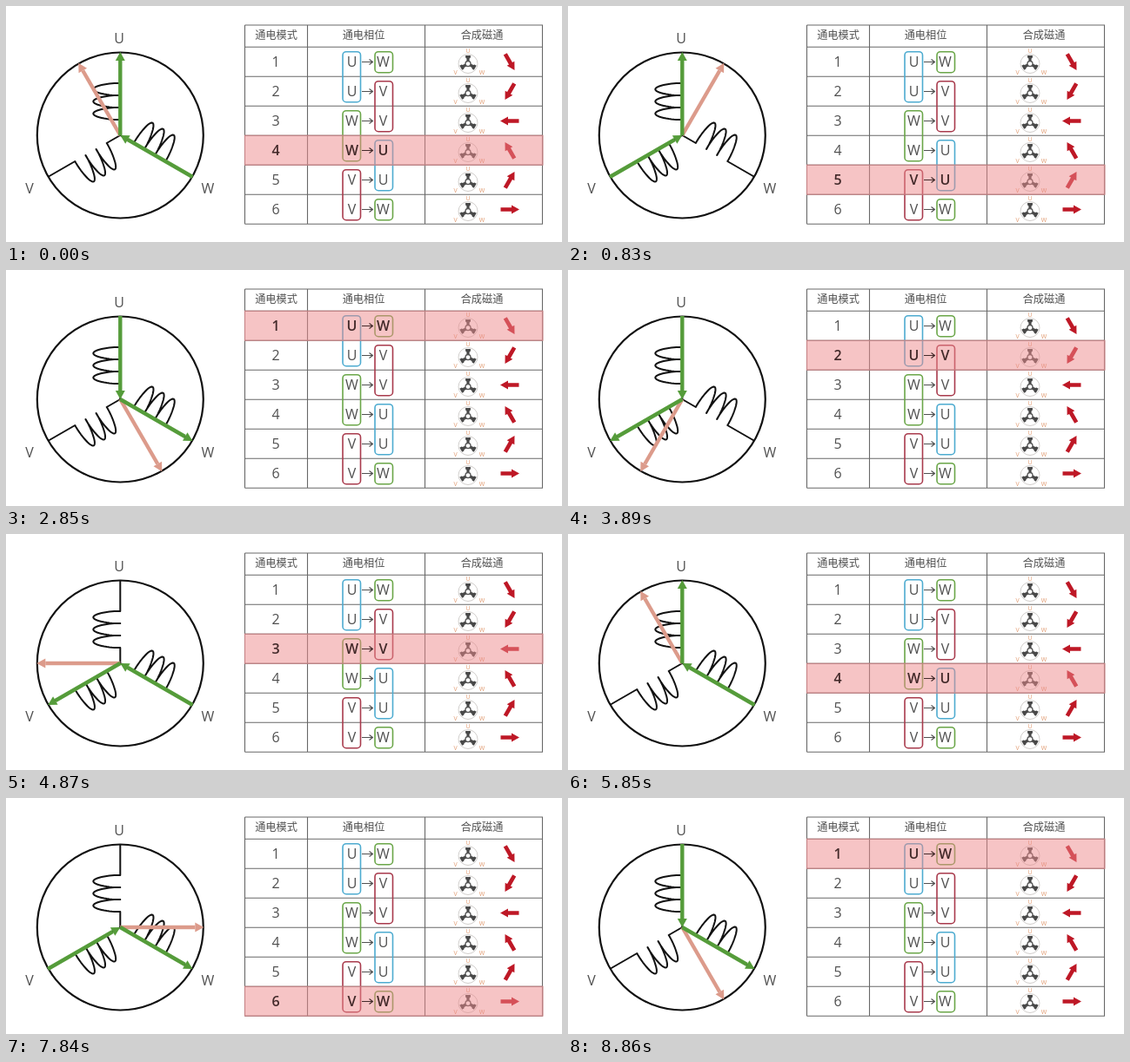
Write an HTML page that moves like this. It is 639 by 272 pixels and loops after 8.96 s.

```html
<!DOCTYPE html>
<html lang="zh">
<head>
<meta charset="utf-8">
<style>
html, body { margin: 0; width: 100%; height: 100%; overflow: hidden; background: #fff; }
svg { display: block; width: 639px; height: 272px; }
text { font-family: "Open Sans", "Noto Sans", sans-serif; font-size: 16px; fill: #505050; text-anchor: middle; }
.head { font-family: "Noto Sans CJK SC", "Noto Sans CJK", sans-serif; font-size: 12.2px; }
.tiny { font-size: 7px; fill: #e09a70; }
.active text { fill: #432a2a; font-weight: 600; }
.active path { stroke: #432a2a; }
</style>
</head>
<body>
<svg id="stage" viewBox="0 0 639 272"></svg>
<script>
const LOOP = 8960;
const STEPS = [[0, 4], [830, 5], [1850, 6], [2850, 1], [3890, 2], [4870, 3],
  [5850, 4], [6870, 5], [7840, 6], [8860, 1]];
const MODES = ['UW', 'UV', 'WV', 'WU', 'VU', 'VW'];
const AXIS = { U: -90, V: 150, W: 30 };
const GREEN = '#559c3a', FLUX = '#dc9b8b', RED = '#be1826';
const TOP = 47.2, PITCH = 34, LEFT = 274.5, RIGHT = 617;
const stage = document.getElementById('stage');

function add(parent, tag, attrs = {}, content) {
  const node = document.createElementNS('http://www.w3.org/2000/svg', tag);
  for (const key in attrs) node.setAttribute(key, attrs[key]);
  if (content) node.textContent = content;
  parent.append(node);
  return node;
}
const group = (parent, transform = '') => add(parent, 'g', { transform });
const stroke = (parent, d, color, width) =>
  add(parent, 'path', { d, fill: 'none', stroke: color, 'stroke-width': width, 'stroke-linejoin': 'round' });
const label = (parent, x, y, content, cls = '') => add(parent, 'text', { x, y, class: cls }, content);

// Straight arrow along the x axis of its group, ending at x = to.
function arrow(parent, angle, from, to, color) {
  const g = group(parent, `rotate(${angle})`);
  const back = to - Math.sign(to - from) * 10;
  stroke(g, `M${from} 0H${back}`, color, 4.4);
  add(g, 'path', { d: `M${to} 0L${back} -5.5V5.5Z`, fill: color });
}

// Winding on the upward axis, bulging to the left.
function coilPath() {
  const turns = 3, start = -60, end = -18, steps = 96;
  let d = 'M0 -96';
  for (let i = 0; i <= steps; i++) {
    const t = i / steps, a = t * turns * 2 * Math.PI;
    const x = -15.5 + 15.5 * Math.cos(a);
    const y = start + (end - start) * t - 2.5 * Math.sin(a);
    d += `L${x.toFixed(1)} ${y.toFixed(1)}`;
  }
  return d + 'L0 0';
}

function drawMotor() {
  const motor = group(stage, 'translate(131.3 149)');
  add(motor, 'circle', { r: 95.5, fill: 'none', stroke: '#111', 'stroke-width': 2.2 });
  const coil = coilPath();
  for (const phase in AXIS) stroke(group(motor, `rotate(${AXIS[phase] + 90})`), coil, '#111', 2);
  label(stage, 130, 43, 'U');
  label(stage, 27, 216, 'V');
  label(stage, 232, 216, 'W');
  return MODES.map(([source, sink], i) => {
    const g = group(motor);
    arrow(g, 60 * (i + 1), 0, 96, FLUX);
    arrow(g, AXIS[sink], 0, 96, GREEN);
    arrow(g, AXIS[source], 96, 0, GREEN);
    return g;
  });
}

function drawIcon(y) {
  const g = group(stage, `translate(531 ${y})`);
  add(g, 'circle', { r: 11, fill: 'none', stroke: '#c4c0be', 'stroke-width': 0.8 });
  for (const angle of Object.values(AXIS)) {
    const arm = group(g, `rotate(${angle})`);
    add(arm, 'path', { d: 'M2 -1.6H6L7 -2.9H9.5V2.9H7L6 1.6H2Z', fill: '#484848' });
  }
  add(g, 'circle', { r: 3, fill: '#fff', stroke: '#555', 'stroke-width': 1.3 });
  label(g, 0, -13, 'U', 'tiny');
  label(g, -14.5, 12.5, 'V', 'tiny');
  label(g, 16, 12.5, 'W', 'tiny');
}

function drawTable() {
  let grid = `M${LEFT} 22H${RIGHT}`;
  for (let i = 0; i <= 6; i++) grid += `M${LEFT} ${TOP + i * PITCH}H${RIGHT}`;
  for (const x of [LEFT, 346.5, 481.5, 616.5]) grid += `M${x} 22V${TOP + 6 * PITCH}`;
  stroke(stage, grid, '#686868', 1.1);
  label(stage, 310.5, 38, '通电模式', 'head');
  label(stage, 411, 38, '通电相位', 'head');
  label(stage, 547, 38, '合成磁通', 'head');

  const blue = '#4dabd0', green = '#6aa648', red = '#a83a4c';
  const frames = [[387, 0, 2, blue], [424, 0, 1, green], [424, 1, 2, red], [387, 2, 2, green],
    [424, 3, 2, blue], [387, 4, 2, red], [424, 5, 1, green]];
  for (const [x, row, span, color] of frames) {
    add(stage, 'rect', { x, y: 52.7 + row * PITCH, width: 20.5, height: span * PITCH - 10, rx: 4,
      fill: 'none', stroke: color, 'stroke-width': 1.6 });
  }
  MODES.forEach((mode, i) => {
    const y = 64.5 + i * PITCH;
    drawIcon(y + 2);
    const g = group(stage, `translate(579 ${y}) rotate(${60 * (i + 1)})`);
    add(g, 'path', { d: 'M-10.5 -2.3H2V-5L11 0L2 5V2.3H-10.5Z', fill: RED });
  });

  const band = add(stage, 'rect', { x: LEFT, width: RIGHT - LEFT, height: PITCH,
    fill: '#ee8a8c', 'fill-opacity': 0.5, stroke: '#c98486', 'stroke-width': 1 });
  const rows = MODES.map(([source, sink], i) => {
    const y = 64.5 + i * PITCH;
    const g = group(stage);
    label(g, 310, y + 5.8, String(i + 1));
    label(g, 397.5, y + 5.8, source);
    label(g, 433.5, y + 5.8, sink);
    stroke(g, `M409 ${y}H421M417.5 ${y - 3}L421.5 ${y}L417.5 ${y + 3}`, '#505050', 1.1);
    return g;
  });
  return { band, rows };
}

const currents = drawMotor();
const { band, rows } = drawTable();
const origin = performance.now();
let shown = 0;

function show(mode) {
  if (mode === shown) return;
  shown = mode;
  currents.forEach((g, i) => { g.style.display = i + 1 === mode ? '' : 'none'; });
  rows.forEach((g, i) => g.classList.toggle('active', i + 1 === mode));
  band.setAttribute('y', TOP + (mode - 1) * PITCH);
}

function tick() {
  const time = (performance.now() - origin) % LOOP;
  show(STEPS.findLast(([start]) => start <= time)[1]);
  requestAnimationFrame(tick);
}
tick();
</script>
</body>
</html>
```
